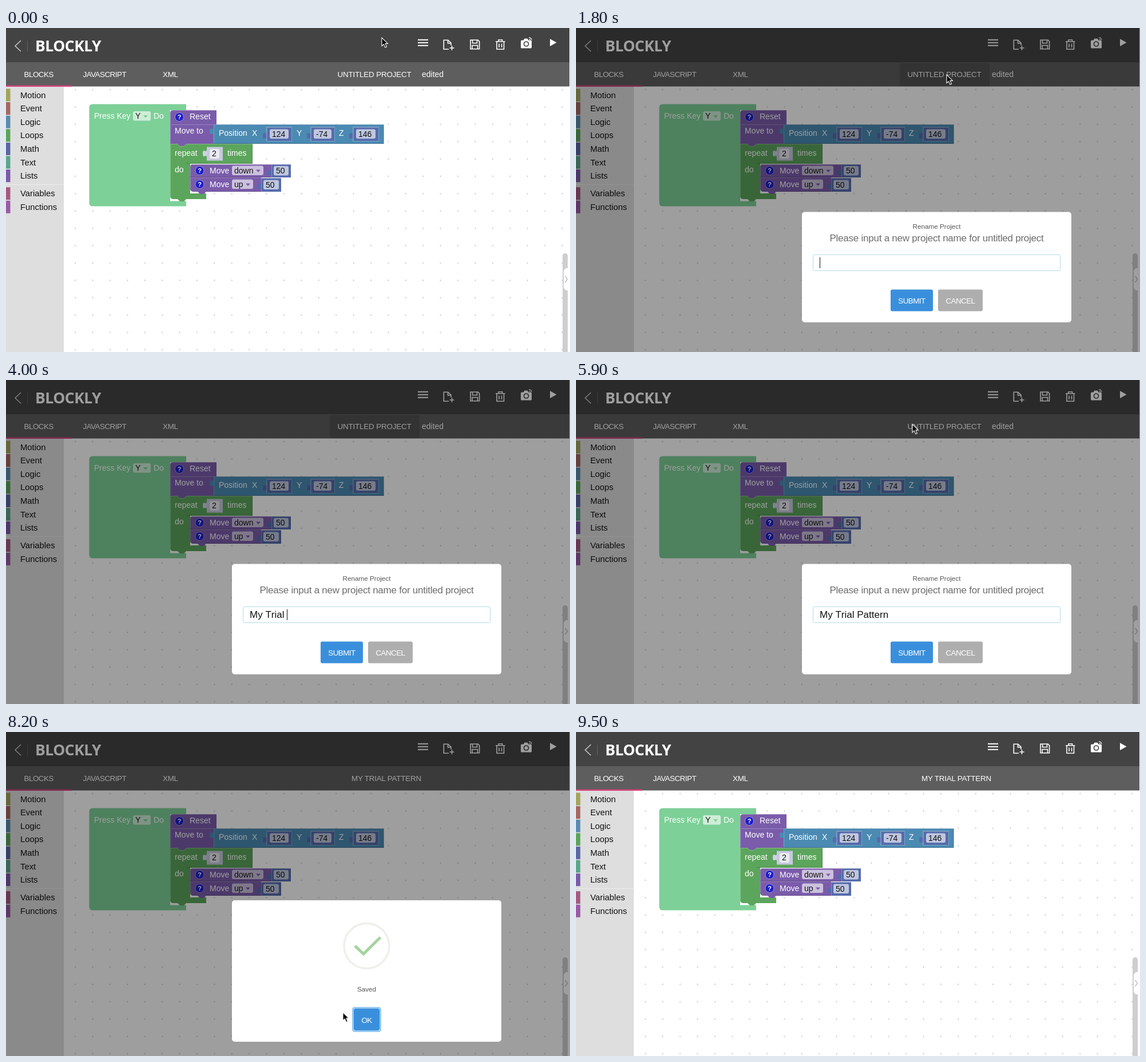
An HTML page that plays this animation: 986 by 568 pixels, repeating every 9600 ms.

```html
<!DOCTYPE html>
<html lang="en">
<head>
<meta charset="utf-8">
<title>Renaming a Blockly project</title>
<style>
html, body { margin: 0; width: 986px; height: 568px; overflow: hidden; background: #fff; }
svg { display: block; font-family: "Liberation Sans", Arial, sans-serif; }
.tab { font-size: 13.4px; fill: #fff; }
.tight { letter-spacing: -.5px; }
.mid { text-anchor: middle; }
.block text { font-size: 14px; fill: #fff; }
.block .dark { fill: #111; }
.line { fill: none; stroke: #fff; }
.edge { fill: none; stroke: #fff; stroke-opacity: .24; }
.field { fill: #fff; fill-opacity: .62; }
.purple { fill: #7a5caa; }
.green { fill: #5ca55c; }
.blue { fill: #4b8ab2; }
.indigo { fill: #566bab; }
.btn { font-size: 13.4px; fill: #fff; letter-spacing: -.55px; }
.ring { fill: none; stroke: #96c9f3; stroke-width: 3; }

.live, #typed span, #typed i { animation: 9.6s step-end infinite; }
.dialog { transform-origin: 630.5px 419px; }
#veil { animation-name: veil; }
#rename { animation-name: rename; }
#saved { animation-name: saved; }
#hover { animation-name: hover; }
#before { animation-name: before; }
#after { animation-name: after; }
#box { animation-name: blur; }
#pressed { animation-name: press; }
#check { stroke-dasharray: 100; animation-name: draw; }
#pointer { animation: move 9.6s ease-in-out infinite; }
#arrow { animation-name: arrow; }
#typed { margin: 0; height: 27px; display: flex; align-items: center; white-space: pre; color: #111; }
#typed span { font-size: 0; animation-name: type; }
#typed i { width: 1px; height: 19px; background: #111; animation-name: blink; }

@keyframes veil {
  0% { opacity: 0 } 15.62% { opacity: .5 } 16.66% { opacity: 1 }
  90.62% { opacity: .5 } 91.66%, 100% { opacity: 0 }
}
@keyframes rename {
  0% { visibility: hidden; transform: none }
  15.62% { visibility: visible; transform: scale(.92) }
  16.66% { visibility: visible; transform: scale(1.034) }
  17.7% { visibility: visible; transform: scale(.96) }
  18.74% { visibility: visible; transform: none }
  72.91%, 100% { visibility: hidden; transform: none }
}
@keyframes saved {
  0% { visibility: hidden; transform: none; opacity: 1 }
  72.91% { visibility: visible; transform: scale(.92); opacity: 1 }
  73.95% { visibility: visible; transform: scale(1.034); opacity: 1 }
  74.99% { visibility: visible; transform: scale(.96); opacity: 1 }
  76.03% { visibility: visible; transform: none; opacity: 1 }
  90.62% { visibility: visible; transform: scale(.75); opacity: .4 }
  91.66%, 100% { visibility: hidden; transform: none; opacity: 0 }
}
@keyframes hover { 0% { opacity: 0 } 9.37% { opacity: 1 } 57.28%, 100% { opacity: 0 } }
@keyframes before { 0% { opacity: 1 } 73.95%, 100% { opacity: 0 } }
@keyframes after { 0% { opacity: 0 } 73.95%, 100% { opacity: 1 } }
@keyframes blur { 0% { stroke: #b4daee } 70.83%, 100% { stroke: #d8d8d8 } }
@keyframes press { 0% { opacity: 0 } 70.83%, 100% { opacity: 1 } }
@keyframes draw {
  0% { stroke-dashoffset: 100 } 77.07% { stroke-dashoffset: 80 }
  78.11% { stroke-dashoffset: 40 } 79.16%, 100% { stroke-dashoffset: 0 }
}
@keyframes type { 0% { font-size: 17px } 60%, 100% { font-size: 0 } }
@keyframes blink {
  0% { opacity: 1 } 20.83% { opacity: 0 } 26.04% { opacity: 1 }
  57.28% { opacity: 0 } 62.49% { opacity: 1 } 67.7%, 100% { opacity: 0 }
}
@keyframes arrow {
  0% { opacity: 1 } 28.64% { opacity: 0 } 57.28% { opacity: 1 } 93.74%, 100% { opacity: 0 }
}
@keyframes move {
  0%, 3.1% { transform: translate(657px, 17px) }
  6.5% { transform: translate(660px, 52px) }
  10.4%, 57.28% { transform: translate(648px, 82px) }
  61.4%, 63% { transform: translate(588px, 77.5px) }
  69.8%, 86.4% { transform: translate(589px, 491.5px) }
  88.5%, 90.6% { transform: translate(627px, 506px) }
  93.7%, 100% { transform: translate(640px, 580px) }
}
</style>
</head>
<body>
<svg width="986" height="568" viewBox="0 0 986 568">
  <defs>
    <pattern id="dots" x="106" y="92.8" width="30.4" height="30.4" patternUnits="userSpaceOnUse">
      <rect x="14.3" y="14.3" width="1.8" height="1.8" fill="#b8b8b8"/>
    </pattern>
  </defs>

  <!-- workspace -->
  <rect width="986" height="568" fill="#fff"/>
  <rect x="101" y="103" width="884" height="465" fill="url(#dots)"/>
  <rect x="973" y="395" width="9" height="180" rx="4.5" fill="#cecece"/>
  <path d="M985 421h-6l-4 4v31l4 4h6z" fill="#fff"/>
  <path d="M977.5 435l4 5.5-4 5.5" fill="none" stroke="#bbb" stroke-width="1.3"/>

  <!-- header -->
  <rect width="985" height="60" fill="#434343"/>
  <rect y="60" width="985" height="42.5" fill="#5e5e5e"/>
  <path d="M26 22L16 31.5l10 9.5" class="line" style="stroke:#c8c8c8" stroke-width="1.6"/>
  <path d="M37.5 22v19" stroke="#626262"/>
  <text x="51" y="40.5" font-family="Open Sans, Noto Sans, sans-serif" font-size="26.5" font-weight="700" letter-spacing="-.5" fill="#fff">BLOCKLY</text>
  <g class="line" stroke-width="1.6">
    <path d="M720 20.8h18M720 25.8h18M720 30.8h18" stroke-width="2"/>
    <path d="M774 37.2h-8.7V21.2h7.5l5.2 5.2v4M772.5 21.5v5.2h5.2M779.5 31v8M775.5 35h8"/>
    <path d="M812 21h13l2.6 2.6v13.2H812zM815.5 21v5.5h8V21M815 36.5v-6h9.5v6"/>
    <path d="M856 23.8h16.5M861 23.5v-2.8h6.5v2.8M858 24v13.2h12.5V24M862 27.5v6.5M866.5 27.5v6.5"/>
  </g>
  <path d="M901.5 21.5h3l2-3h5l2 3h4q1.5 0 1.5 1.5v11q0 1.5-1.5 1.5h-16q-1.5 0-1.5-1.5V23q0-1.5 1.5-1.5z" fill="#fff"/>
  <circle cx="909.5" cy="28" r="4" fill="#fff" stroke="#434343" stroke-width="1.7"/>
  <path d="M914 16.5q4.5.5 5 4.5M914.5 19.2q1.5.3 2 1.8" class="line" stroke-width="1.2"/>
  <path d="M951 19l11.5 6.5-11.5 6.5z" fill="#fff"/>
  <g class="tab">
    <rect id="hover" class="live" x="566" y="62" width="157" height="40" fill="#000" fill-opacity=".13"/>
    <text class="tight" x="31.5" y="86">BLOCKS</text>
    <text class="tight" x="134.5" y="86">JAVASCRIPT</text>
    <text x="274" y="86" letter-spacing="-.3">XML</text>
    <g id="before" class="live">
      <text class="mid" x="644" y="86" letter-spacing="-.17">UNTITLED PROJECT</text>
      <text x="727" y="86" font-size="14">edited</text>
    </g>
    <text id="after" class="live mid" x="665" y="86" letter-spacing="-.2">MY TRIAL PATTERN</text>
  </g>

  <!-- toolbox -->
  <rect y="102.5" width="101" height="466" fill="#dedede"/>
  <path d="M0 274.5h101" stroke="#ececec"/>
  <rect y="100.5" width="115" height="2.5" fill="#d8437c"/>
  <g id="tools" font-size="14.8" fill="#111"></g>

  <!-- program -->
  <g class="block">
    <path d="M151.5 133.5H315V144h-28v159.500h28v9H151.500q-6 0-6-6v-167q0-6 6-6z" fill="#7dd097"/>
    <path class="purple" d="M287 149q0-5 5-5h76v25h-81z"/>
    <path class="purple" d="M287 169h76v34h-76z"/>
    <path class="blue" d="M363 169h297.500v34H363z"/>
    <path class="blue" d="M363 174c0 8-7-4-7 7s7-1 7 7z"/>
    <path class="green" d="M287 203h144v35H322v52h28v10h-35l-4 4h-7l-4-4h-7q-6 0-6-6z"/>
    <path class="purple" d="M300 203h15l-4 4h-7z"/>
    <path class="purple" d="M322 243q0-4 4-4h138v23H322z"/>
    <path class="purple" d="M322 262h124v25h-96l-4 4h-7l-4-4h-7q-6 0-6-6z"/>
    <path class="edge" d="M287.5 168v-19q0-4.500 4.500-4.500h76M287.500 202v-32.500h75.500M363.500 202v-32.500h297M287.500 294v-90.500h12.500l4 4h7l4-4h116M322.500 261v-18q0-3.500 3.500-3.500h138M322.500 281v-18.500h123"/>
    <path d="M363 202.500h297M660 170v33M315 237.500h116M430.500 204v34M322 261.500h142M350 286.500h96" fill="none" stroke="#000" stroke-opacity=".18"/>
    <text x="154" y="159">Press Key</text>
    <text x="258" y="159">Do</text>
    <text x="321" y="160">Reset</text>
    <text x="295" y="185">Move to</text>
    <text x="372" y="189">Position</text>
    <text x="430" y="189">X</text>
    <text x="508" y="189">Y</text>
    <text x="582" y="189">Z</text>
    <text x="295" y="224">repeat</text>
    <text x="387" y="224">times</text>
    <text x="295" y="253">do</text>
    <text x="356" y="254.500">Move</text>
    <text x="356" y="278.500">Move</text>
    <path d="M351 213c0 8-7-4-7 7s7-1 7 7z" fill="#cfd2e4"/>
    <rect x="351" y="208.500" width="28" height="24" fill="#c6c9dd"/>
    <rect x="356" y="212" width="17" height="17" rx="3" class="field"/>
    <text class="dark" x="360" y="225">2</text>
    <g id="parts"></g>
  </g>

  <rect id="veil" class="live" width="986" height="568" fill="#000" fill-opacity=".38"/>

  <!-- rename dialog -->
  <g id="rename" class="live dialog">
    <rect x="395" y="322.5" width="471" height="193.500" rx="5" fill="#fff"/>
    <text class="mid" x="630.5" y="352" font-size="11.7" fill="#555">Rename Project</text>
    <text class="mid" x="630.5" y="374" font-size="17" letter-spacing="-.24" fill="#6c6c6c">Please input a new project name for untitled project</text>
    <rect id="box" class="live" x="414.5" y="397.5" width="432" height="28" rx="2" fill="#fff"/>
    <foreignObject x="426" y="398" width="410" height="27"><p id="typed"></p></foreignObject>
    <rect x="550" y="458.5" width="74" height="38" rx="3" fill="#3a8fdc"/>
    <g id="pressed" class="live">
      <rect x="550" y="458.5" width="74" height="38" rx="3" fill="#2f74b3"/>
      <rect class="ring" x="548.5" y="457" width="77" height="41" rx="3"/>
    </g>
    <rect x="633" y="458.5" width="78" height="38" rx="3" fill="#aeaeae"/>
    <text class="btn mid" x="587" y="483">SUBMIT</text>
    <text class="btn mid" x="672" y="483">CANCEL</text>
  </g>

  <!-- confirmation -->
  <g id="saved" class="live dialog">
    <rect x="395" y="295" width="471" height="248" rx="5" fill="#fff"/>
    <circle cx="630.5" cy="375" r="39.5" fill="none" stroke="#efefeb" stroke-width="3.5"/>
    <path id="check" class="live" pathLength="100" d="M610 375l15 14 29.5-29" fill="none" stroke="#a3d39c" stroke-width="5"/>
    <text class="mid" x="630.5" y="455" font-size="11.7" fill="#555">Saved</text>
    <rect x="608" y="485" width="45" height="38" rx="3" fill="#3a8fdc"/>
    <rect class="ring" x="606.5" y="483.5" width="48" height="41" rx="3"/>
    <text class="btn mid" x="630.5" y="509.5">OK</text>
  </g>

  <g id="pointer">
    <path id="arrow" class="live" d="M0 0v14.5l3.3-3.1 2.5 5.6 2.6-1.1-2.5-5.5h4.500z" fill="#000" stroke="#fff" stroke-width="1.1"/>
  </g>
</svg>
<script>
const $ = id => document.getElementById(id);

const tools = [
  ['Motion', '#a3a55b'], ['Event', '#a5675f'], ['Logic', '#5b8bb0'],
  ['Loops', '#5ba55b'], ['Math', '#5b67a5'], ['Text', '#5ba58c'],
  ['Lists', '#7a5ba9'], ['Variables', '#a55b80'], ['Functions', '#995ba5']
];
$('tools').innerHTML = tools.map(([name, color], i) => {
  const y = 117.5 + i * 23.6 + (i > 6 ? 7.5 : 0);
  return `<rect y="${y - 11}" width="7.5" height="22" fill="${color}"/>
    <text x="25" y="${y + 5}">${name}</text>`;
}).join('');

const field = (x, y, w, label) =>
  `<rect class="field" x="${x}" y="${y}" width="${w}" height="16.5" rx="3"/>
   <text class="dark" x="${x + 4}" y="${y + 13}">${label}</text>`;

const number = (x, y, w, h, label, pad) =>
  `<path class="indigo" d="M${x} ${y}h${w}v${h}h${-w}v${8 - h}c0 8-7-4-7 7s7-1 7 7v-14z"/>
   <path class="edge" d="M${x + .5} ${y + h}v${.5 - h}h${w - .5}"/>
   ${field(x + pad, y + h / 2 - 8.5, w - 2 * pad, label)}`;

const menu = (x, y, w, label, color) =>
  field(x, y, w, label) +
  `<path d="M${x + w - 13} ${y + 7}h8l-4 4.5z" fill="${color}"/>`;

const help = (x, y) =>
  `<circle cx="${x}" cy="${y}" r="7.5" fill="#1d1dc8" stroke="#aaa4e0" stroke-width=".8"/>
   <text class="mid" x="${x}" y="${y + 4}" style="font-size:11px;font-weight:bold">?</text>`;

// Outlined sockets behind the three coordinates
const socket = (x, w) =>
  `<rect class="edge" x="${x - .5}" y="173.5" width="${w + 1}" height="25"/>`;

$('parts').innerHTML = [
  menu(222, 146, 31, 'Y', '#7dd097'),
  help(303, 156), help(338.5, 250), help(338.5, 274),
  number(456, 174, 43, 24, '124', 5), socket(456, 43),
  number(533, 174, 41, 24, '-74', 5), socket(533, 41),
  number(607, 174, 44, 24, '146', 5), socket(607, 44),
  menu(395, 241.5, 55, 'down', '#7a5caa'),
  menu(395, 265.5, 37, 'up', '#7a5caa'),
  number(464, 239, 34, 23, '50', 4),
  number(446, 263, 35, 24, '50', 4)
].join('');

// Each letter appears one keystroke after the last
$('typed').innerHTML = [...'My Trial Pattern'].map((c, i) =>
  `<span style="animation-delay:${2750 + i * 150}ms">${c}</span>`).join('') + '<i></i>';
</script>
</body>
</html>
```
